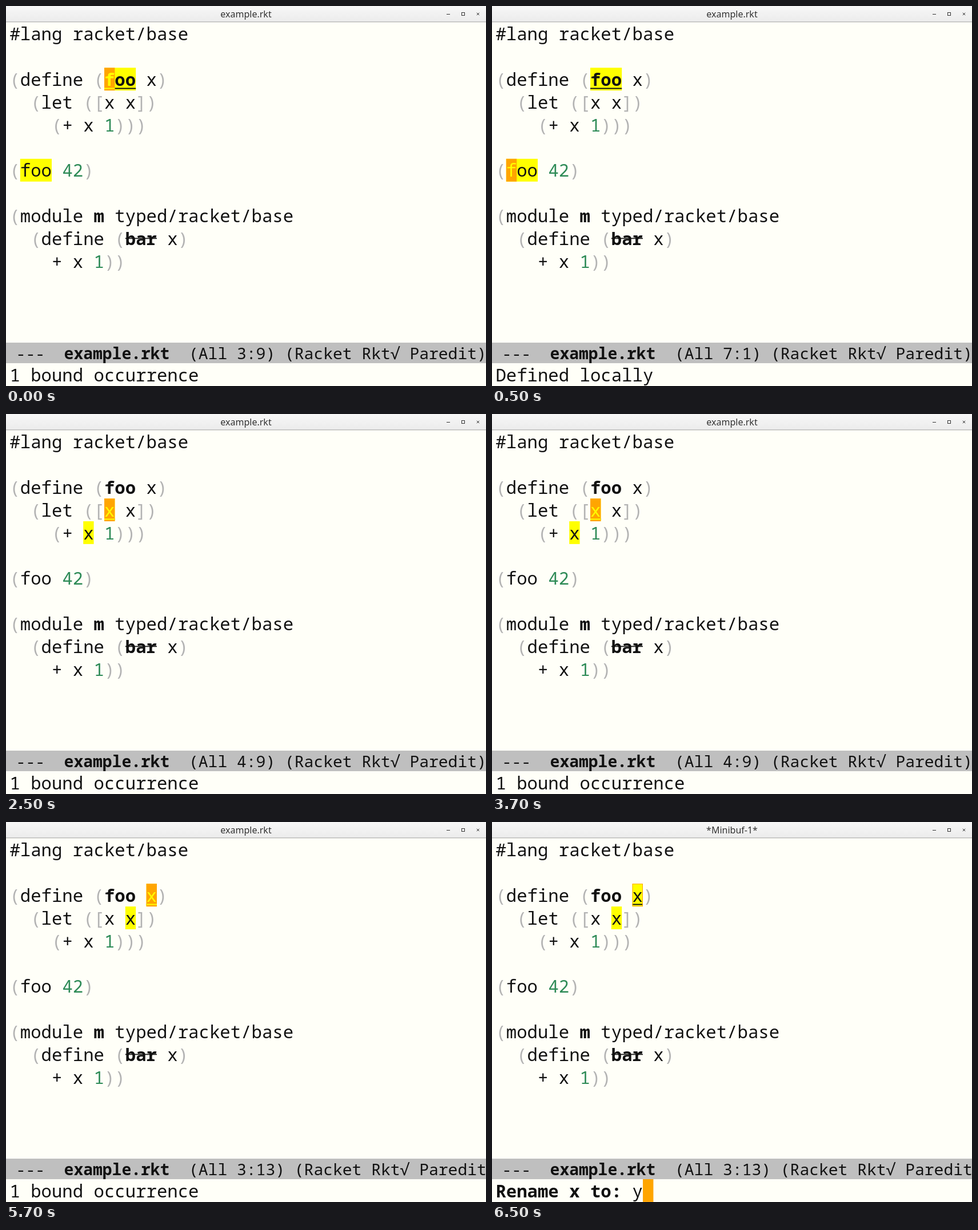
These frames come from a looping animation (840 by 666 pixels, 8000 ms). An HTML page:

```html
<!DOCTYPE html>
<html lang="en">
<head>
<meta charset="utf-8">
<title>example.rkt</title>
<style>
  html, body { margin: 0; height: 100%; overflow: hidden; background: #fffff8; }
  svg { display: block; }
  text { font: 30.667px "Noto Sans Mono", "Liberation Mono", monospace; fill: #111; white-space: pre; }
  .title { font: 16px "Noto Sans", "Open Sans", sans-serif; fill: #333; text-anchor: middle; }
  .mode { font-size: 28px; }
  .b { font-weight: bold; }
  .p { fill: #b3b3b3; }
  .n { fill: #2e8b57; }
  .y { fill: #ff0; }
</style>
</head>
<body>
<svg width="840" height="666" viewBox="0 0 840 666">
  <defs>
    <linearGradient id="bar" x2="0" y2="1">
      <stop stop-color="#f7f7f7"/><stop offset="1" stop-color="#ececec"/>
    </linearGradient>
  </defs>
  <rect width="840" height="666" fill="#fffff8"/>
  <rect width="840" height="27" fill="url(#bar)"/>
  <rect y="27" width="840" height="1.5" fill="#bcbcbc"/>
  <g fill="none" stroke="#333">
    <path d="M771 14.5h6M823.8 11.8l4.4 4.4m0-4.4l-4.4 4.4"/>
    <rect x="797.5" y="11.5" width="5" height="5"/>
  </g>
  <rect y="590" width="840" height="36" fill="#bfbfbf"/>
  <g id="marks"></g>
  <g id="code"></g>
  <g id="state"></g>
</svg>
<script>
const CELL = 18.4, ROW = 39.9, MODE = 16.8, MINI = 16;
const $ = id => document.getElementById(id);
const left = col => 6.4 + col * CELL;
const top_ = row => row === MINI ? 626 : 28.4 + (row - 1) * ROW;

const rect = (x, y, w, h, fill) =>
  `<rect x="${x}" y="${y}" width="${w}" height="${h}" fill="${fill}"/>`;
const text = (x, y, s, cls = '') =>
  `<text x="${x}" y="${y}" class="${cls}" xml:space="preserve">${s}</text>`;
const put = (row, col, s, cls) => text(left(col), top_(row) + 31.5, s, cls);
const box = (row, col, n, fill) => rect(left(col), top_(row), n * CELL, ROW, fill);
const line = (row, col, n, dy, h, fill) =>
  rect(left(col), top_(row) + dy, n * CELL, h, fill);
const mode = (col, s, cls = '') => text(0.8 + col * MODE, 619, s, 'mode ' + cls);

const source = `#lang racket/base

(define (*foo* x)
  (let ([x x])
    (+ x 1)))

(foo 42)

(module *m* typed/racket/base
  (define (*bar* x)
    + x 1))`;

const paint = s => s
  .replace(/[()[\]]+/g, '<tspan class="p">$&</tspan>')
  .replace(/\b\d+\b/g, '<tspan class="n">$&</tspan>')
  .replace(/\*(\w+)\*/g, '<tspan class="b">$1</tspan>');

$('code').innerHTML =
  source.split('\n').map((s, i) => put(i + 1, 0, paint(s))).join('') +
  line(10, 11, 3, 19, 1.7, '#111') +
  mode(1, '---') + mode(6, 'example.rkt', 'b');

// def and use: [row, column, length]; cursor: [row, column, glyph, classes]
const foo = { def: [3, 9, 3], use: [7, 1, 3] };
const inner = { def: [4, 9, 1], use: [5, 7, 1] };
const outer = { def: [3, 13, 1], use: [4, 11, 1] };
const steps = [
  { at: 0, ...foo, cursor: [3, 9, 'f', 'b y'], pos: '3:9', say: '1 bound occurrence' },
  { at: 500, ...foo, cursor: [7, 1, 'f', 'y'], pos: '7:1', say: 'Defined locally' },
  { at: 2500, ...inner, cursor: [4, 9, 'x', 'y'], pos: '4:9', say: '1 bound occurrence' },
  { at: 4500, ...outer, cursor: [3, 13, 'x', 'y'], pos: '3:13', say: '1 bound occurrence' },
  { at: 6500, ...outer, cursor: [MINI, 14, '', 'y'], pos: '3:13', rename: 'y' }
];

function show({ def, use, cursor, pos, say, rename }) {
  const [row, col, glyph, cls] = cursor;
  const onDef = row === def[0] && col === def[1];
  const end = 19 + `(All ${pos}) `.length;

  $('marks').innerHTML = box(...def, '#ff0') + box(...use, '#ff0') +
    line(...def, 35.3, 2, '#111');

  let out = text(420, 20, rename ? '*Minibuf-1*' : 'example.rkt', 'title') +
    mode(19, `(All ${pos})`) + mode(end, '(Racket Rkt') +
    mode(end + 11, '√') + mode(end + 13, 'Paredit)');
  out += rename
    ? put(MINI, 0, 'Rename x to:', 'b') + put(MINI, 13, rename)
    : put(MINI, 0, say);
  out += box(row, col, 1, '#ffa500') + put(row, col, glyph, cls);
  if (onDef) out += line(row, col, 1, 35.3, 2, '#ff0');
  if (rename) {
    out += `<rect x="${left(def[1]) + .5}" y="${top_(def[0]) + .5}" width="${CELL - 1}"
      height="${ROW - 1}" fill="none" stroke="#ffa500"/>`;
  }
  $('state').innerHTML = out;
}

const start = performance.now();
let current;
function tick() {
  const t = (performance.now() - start) % 8000;
  const step = steps.findLast(s => s.at <= t);
  if (step !== current) show(current = step);
  requestAnimationFrame(tick);
}
tick();
</script>
</body>
</html>
```
